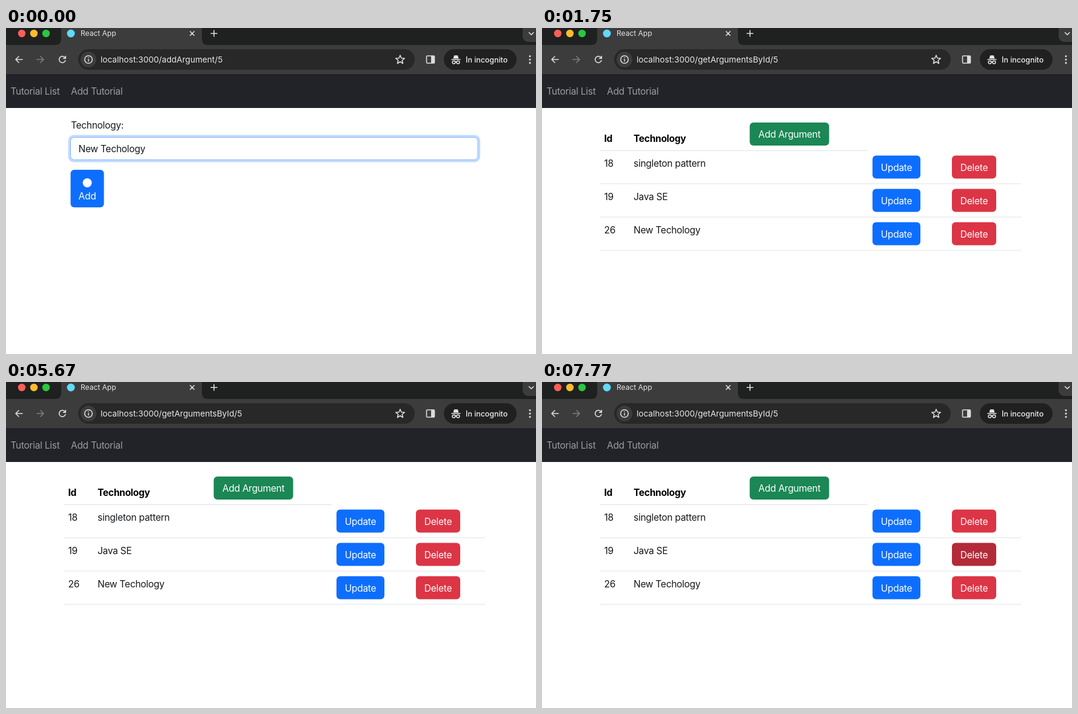
Animation of 874 by 538 pixels, one loop 8000 ms. Source, as an HTML page:

```html
<!DOCTYPE html>
<html lang="en">
<head>
<meta charset="utf-8">
<title>React App</title>
<style>
  html, body { margin: 0; width: 100%; height: 100%; overflow: hidden; background: #fff; }
  svg { display: block; width: 874px; height: 538px; }
  text { font: 15.5px Inter, "Open Sans", sans-serif; letter-spacing: -.28px; fill: #15181b; white-space: pre; }
  .bar { font-size: 12px; letter-spacing: 0; fill: #e6e6e6; }
  .url { font-size: 13.6px; letter-spacing: 0; fill: #e8e8e8; }
  .chip { font-size: 12.4px; font-weight: 500; letter-spacing: 0; fill: #eee; }
  .nav { fill: #9b9c9f; }
  .head { font-weight: 700; fill: #000; }
  .label { fill: #fff; text-anchor: middle; }
  .icon { fill: none; stroke: #dcdcdc; stroke-width: 1.6; stroke-linecap: round; stroke-linejoin: round; }
  .rule { stroke: #dee2e6; }
</style>
</head>
<body>
<svg viewBox="0 0 874 538">
  <!-- window frame -->
  <rect width="874" height="76" fill="#1f2020"/>
  <path d="M0 28H81Q91 28 91 18V0H323V18Q323 28 333 28H874V76H0Z" fill="#3c3c3c"/>
  <circle cx="26" cy="9" r="6.2" fill="#fe5f57"/>
  <circle cx="46" cy="9" r="6.2" fill="#febc2e"/>
  <circle cx="66" cy="9" r="6.2" fill="#28c840"/>
  <circle cx="107" cy="9" r="6.5" fill="#61dafb"/>
  <text class="bar" x="123" y="13">React App</text>
  <path class="icon" d="M303.7 5.7l6.6 6.6m0-6.6l-6.6 6.6M338 9h10M343 4v10"/>
  <rect x="852" y="-8" width="32" height="31" rx="9" fill="#3c3c3c"/>
  <path class="icon" d="M862.5 7.5l3.7 3.6 3.7-3.6"/>

  <!-- toolbar -->
  <path class="icon" d="M27 52H16m5-5l-5 5 5 5"/>
  <path class="icon" d="M51 52h11m-5-5l5 5-5 5" style="stroke:#7d7d7d"/>
  <path class="icon" d="M97.6 49.4A5.3 5.3 0 1 0 98 53.6M98.3 46.5v3.6h-3.7"/>
  <rect x="119" y="35" width="555" height="34" rx="17" fill="#282828"/>
  <circle cx="136" cy="52" r="13" fill="#3c3c3c"/>
  <circle class="icon" cx="136" cy="52" r="6.3"/>
  <path class="icon" d="M136 51.8v3M136 49v.1"/>
  <text id="url" class="url" x="156" y="57"></text>
  <path class="icon" d="M650 45l2 4.7 5.2.4-4 3.4 1.3 5-4.5-2.7-4.5 2.7 1.3-5-4-3.4 5.2-.4z"/>
  <rect class="icon" x="693.5" y="46" width="13" height="12" rx="1.2"/>
  <path d="M701 46h5.5v12H701z" fill="#dcdcdc"/>
  <rect x="722" y="35" width="120" height="34" rx="17" fill="#202020"/>
  <path d="M737.5 50.5l1.5-5.2h6l1.5 5.2z" fill="#e6e6e6"/>
  <path class="icon" d="M735 52h14M741 56q1-.7 2 0"/>
  <circle class="icon" cx="738.5" cy="56.6" r="2.4"/>
  <circle class="icon" cx="745.5" cy="56.6" r="2.4"/>
  <text class="chip" x="758" y="57">In incognito</text>
  <path class="icon" d="M864 46.5v.1M864 52v.1M864 57.5v.1" style="stroke-width:3.2"/>

  <rect y="76" width="874" height="56" fill="#222329"/>
  <text class="nav" x="7.5" y="110">Tutorial List</text>
  <text class="nav" x="107" y="110">Add Tutorial</text>

  <g id="form">
    <text x="107" y="166">Technology:</text>
    <rect x="106.5" y="180.5" width="671.5" height="37" rx="6" fill="#fff" stroke="#dee2e6"/>
    <g id="ring">
      <rect x="102.5" y="176.5" width="679.5" height="45" rx="9.5" fill="#c2dbfe"/>
      <rect x="106.5" y="180.5" width="671.5" height="37" rx="6" fill="#fff" stroke="#86b7fe"/>
    </g>
    <text x="119.5" y="205">New Techology</text>
    <rect id="add" x="106.5" y="234" width="55" height="62" rx="6"/>
    <circle cx="134" cy="255.5" r="7.5" fill="#fff"/>
    <text class="label" x="134" y="283">Add</text>
  </g>
  <g id="list"></g>
</svg>
<script>
const LOOP = 8000, STEP = 70, PAGE_SWITCH = 700;
const BLUE = [13, 110, 253], BLUE_DARK = [11, 94, 215];
const RED = [220, 53, 69], RED_DARK = [187, 45, 59], RED_PRESSED = [179, 43, 56];
const $ = id => document.getElementById(id);
const rgb = c => `rgb(${c.map(Math.round)})`;

const button = (id, x, y, w, label, fill) =>
  `<rect id="${id}" x="${x}" y="${y}" width="${w}" height="38" rx="6" fill="${fill}"/>
   <text class="label" x="${x + w / 2}" y="${y + 25}">${label}</text>`;

const rule = (y, end) => `<path class="rule" d="M95 ${y}H${end}"/>`;

const row = ([id, name], i) => {
  const y = 210.5 + i * 55;
  return `<text x="102.5" y="${y + 18.5}">${id}</text><text x="151" y="${y + 18.5}">${name}</text>` +
    button("update" + i, 545, y, 79, "Update", rgb(BLUE)) +
    button("delete" + i, 676, y, 73, "Delete", rgb(RED)) +
    rule(y + 46.5, 790);
};

$("list").innerHTML =
  `<text class="head" x="102.5" y="188">Id</text><text class="head" x="151" y="188">Technology</text>` +
  button("new", 342.5, 156, 131, "Add Argument", "#1a8754") + rule(202.5, 537) +
  [[18, "singleton pattern"], [19, "Java SE"], [26, "New Techology"]].map(row).join("");

// Each track lists [time, value]; values are arrays, blended linearly.
const tracks = {
  ring: [[350, [1]], [560, [0]]],
  add: [[0, BLUE], [210, BLUE_DARK]],
  update0: [[2240, BLUE], [2450, BLUE_DARK], [2940, BLUE_DARK], [3150, BLUE],
            [4480, BLUE], [4620, BLUE_DARK], [4690, BLUE_DARK], [4900, BLUE]],
  delete1: [[6650, RED], [6860, RED_DARK], [7560, RED_DARK], [7770, RED_PRESSED]]
};

function valueAt(keys, t) {
  const next = keys.findIndex(k => k[0] > t);
  if (next === 0) return keys[0][1];
  if (next < 0) return keys[keys.length - 1][1];
  const [t0, a] = keys[next - 1], [t1, b] = keys[next];
  return a.map((v, i) => v + (b[i] - v) * (t - t0) / (t1 - t0));
}

function draw(now) {
  const t = Math.floor(now % LOOP / STEP) * STEP;
  const onForm = t < PAGE_SWITCH;
  $("form").style.display = onForm ? "" : "none";
  $("list").style.display = onForm ? "none" : "";
  $("url").textContent = "localhost:3000/" + (onForm ? "addArgument/5" : "getArgumentsById/5");
  for (const id in tracks) {
    const v = valueAt(tracks[id], t);
    if (id === "ring") $(id).style.opacity = v[0];
    else $(id).setAttribute("fill", rgb(v));
  }
}

const start = performance.now();
function tick() {
  draw(performance.now() - start);
  requestAnimationFrame(tick);
}
tick();
</script>
</body>
</html>
```
